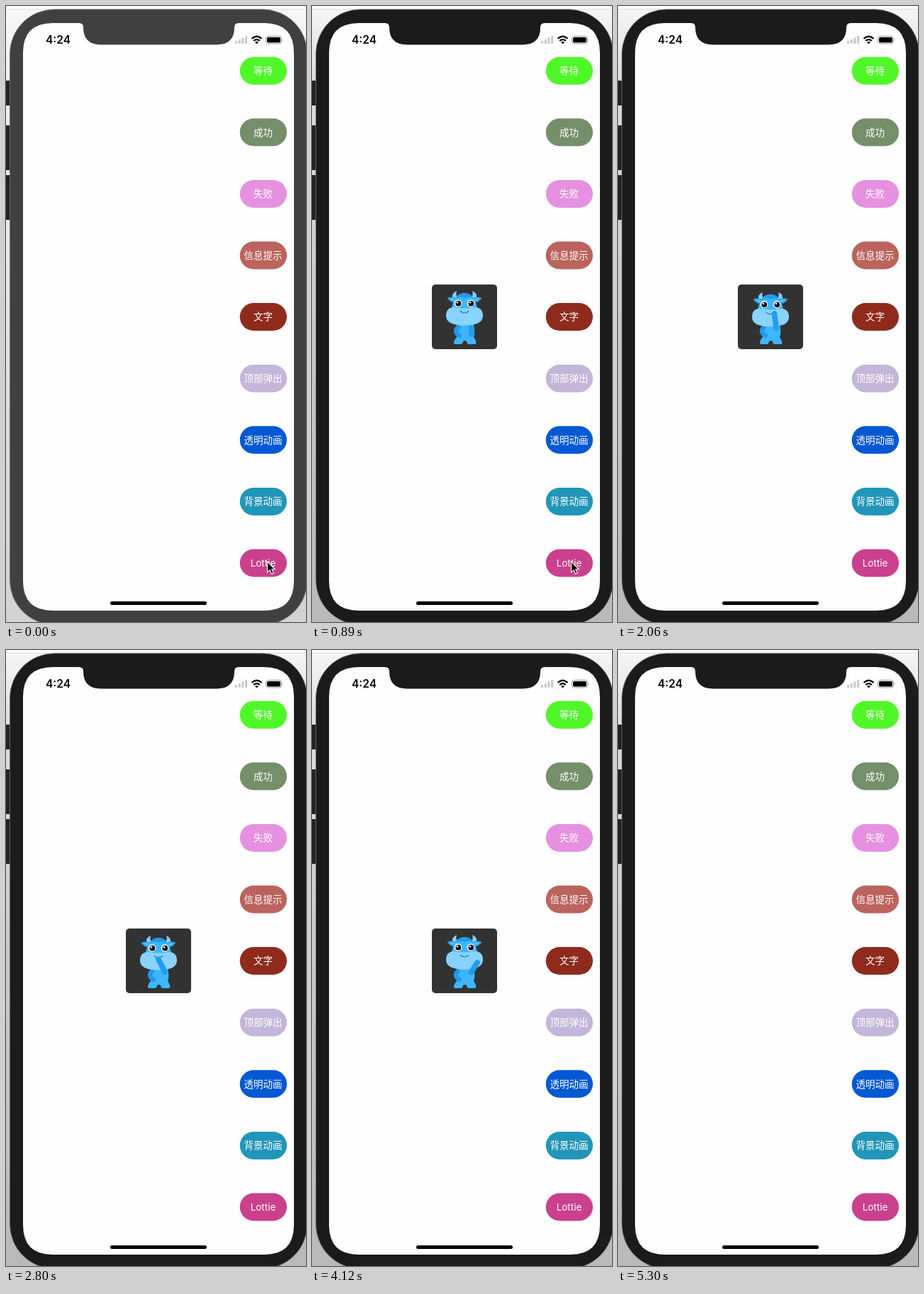
Write an HTML page that moves like this. It is 423 px wide and 867 px high and loops after 5.45 s.

```html
<!DOCTYPE html>
<html lang="zh">
<head>
<meta charset="utf-8">
<title>Popup demo</title>
<style>
  html, body { margin: 0; width: 100%; height: 100%; overflow: hidden; background: #fff; }
  svg { display: block; width: 100vw; height: 100vh; }
  .label { font: 13.5px Inter, "Noto Sans CJK SC", "Noto Sans CJK", sans-serif; fill: #fff; text-anchor: middle; }
  .clock { font: 600 15.5px Inter, sans-serif; }
</style>
</head>
<body>
<svg viewBox="0 0 423 867" preserveAspectRatio="none">
  <defs>
    <linearGradient id="idle" x2="0" y2="1">
      <stop offset="0" stop-color="#f7f7f7"/><stop offset=".12" stop-color="#efefef"/>
      <stop offset=".4" stop-color="#e9e9e9"/><stop offset="1" stop-color="#d2d2d2"/>
    </linearGradient>
    <linearGradient id="active" x2="0" y2="1">
      <stop offset="0" stop-color="#f6f6f6"/><stop offset=".12" stop-color="#dedede"/>
      <stop offset=".4" stop-color="#cfcfcf"/><stop offset="1" stop-color="#b9b9b9"/>
    </linearGradient>
  </defs>

  <rect id="page" width="423" height="867"/>
  <rect width="423" height="4" fill="#fdfdfd"/>
  <path d="M0 4.5H423" stroke="#dcdcdc"/>
  <path d="M0 105H6V140H0ZM0 168H6V231H0ZM0 238H6V301H0Z" fill="#222"/>
  <rect id="bezel" x="5.4" y="4.8" width="419.4" height="866" rx="63" stroke="#777" stroke-width=".8"/>
  <path fill="#fefefe" d="M66 24H103Q109 24 109 30Q109 54.500 134 54.500H297Q322 54.500 322 30Q322 24 328 24H364
    Q406 24 406 66V809Q406 851 364 851H66Q24 851 24 809V66Q24 24 66 24Z"/>

  <text class="clock" x="56" y="53">4:24</text>
  <g fill="#c9c9cb">
    <rect x="323" y="49" width="3" height="4" rx=".8"/><rect x="327.700" y="47" width="3" height="6" rx=".8"/>
    <rect x="332.400" y="44.500" width="3" height="8.500" rx=".8"/><rect x="337.100" y="42" width="3" height="11" rx=".8"/>
  </g>
  <g fill="none" stroke="#000" stroke-width="2.300">
    <path d="M346.500 46Q353.500 39.500 360.500 46"/>
    <path d="M349.200 49Q353.500 45.200 357.800 49"/>
  </g>
  <path d="M351 51Q353.500 48.800 356 51L353.500 53.500Z"/>
  <rect x="366.500" y="42.500" width="22" height="10.500" rx="3" fill="none" stroke="#999"/>
  <rect x="368" y="44" width="19" height="7.500" rx="1.800"/>
  <path d="M389.800 46Q391.600 47.700 389.800 49.500Z" fill="#999"/>
  <rect x="147" y="838" width="136" height="5" rx="2.500"/>

  <g id="buttons"></g>

  <g id="popup">
    <rect x="169" y="392" width="92" height="91" rx="5" fill="#323232"/>
    <path fill="#3db6ff" d="M205 445H227Q231 458 228 466Q231 470 231.500 474Q231.500 476 229 476H221Q218.500 476 218 472
      Q215.500 470 213 472Q212.500 476 210 476H202Q199.500 476 200 473Q201 469 204 466Q202 456 205 445Z"/>
    <path d="M206 452Q201 456 204 461L208 464" fill="none" stroke="#2199ec" stroke-width="6" stroke-linecap="round" stroke-linejoin="round"/>
    <g id="head">
      <g id="side">
        <path d="M199 413Q195.500 404 204 401Q202 407 206 411Z" fill="#83cff8"/>
        <path d="M204 411Q196 408 190.500 411Q195 418 204 418.500Z" fill="#2a9eef"/>
        <path d="M202 412.500Q197 410.500 193.500 411.700Q197 415.500 202 416Z" fill="#58bff9"/>
      </g>
      <use href="#side" transform="translate(430 0) scale(-1 1)"/>
      <path d="M196 432Q199 404 215 404Q231 404 234 432Z" fill="#3db6ff"/>
      <path d="M203 411Q208 404 215 404Q222 404 227 411Q220 408 215 411Q210 408 203 411Z" fill="#219bee"/>
      <g id="eye">
        <circle cx="206" cy="418.500" r="5.300" fill="#fff"/>
        <circle cx="206.300" cy="418.700" r="3.900" fill="#111"/>
        <circle cx="205" cy="417.200" r="1.300" fill="#fff"/>
      </g>
      <use href="#eye" x="18"/>
      <path d="M189 436Q189 424.500 200 424Q215 427 230 424Q241 424.500 241 436Q241 449.500 215 449.500Q189 449.500 189 436Z" fill="#88d3ff"/>
      <path d="M209 429.500Q215 434.500 221 429.500" fill="none" stroke="#1b78be" stroke-width="1.100" stroke-linecap="round"/>
    </g>
    <path id="arm" stroke="#219dee" stroke-width="7.600" stroke-linecap="round"/>
  </g>

  <path id="cursor" d="M0 0V15L3.500 11.800L6 17.500L8.700 16.300L6.200 10.800H10.800Z" stroke="#fff" stroke-width="1.100"/>
</svg>
<script>
  const LOOP = 5450, STEP = LOOP / 37;
  const $ = id => document.getElementById(id);
  const set = (id, name, value) => $(id).setAttribute(name, value);

  const buttons = [
    ['等待', '#50f728'], ['成功', '#748f69'], ['失败', '#e691e0'],
    ['信息提示', '#bb635d'], ['文字', '#8f2b1d'], ['顶部弹出', '#c3b6d9'],
    ['透明动画', '#0259d3'], ['背景动画', '#2196b9'], ['Lottie', '#ca408d']
  ];
  $('buttons').innerHTML = buttons.map(([text, color], i) => {
    const y = 71.7 + 86.6 * i;
    return `<rect x="329.7" y="${y}" width="66.3" height="39" rx="19.5" fill="${color}"/>
      <text class="label" x="362.5" y="${y + 24.3}">${text}</text>`;
  }).join('');

  // step, angle from upright, length, shoulder x, shoulder y
  const armKeys = [
    [6, 176, 9, 224.5, 453], [14, -7, 20, 223, 453], [19, -27, 20, 224, 453],
    [24, -48, 20, 225, 454], [32, 112, 12, 224, 453], [36, 176, 9, 224.5, 453]
  ];

  function armAt(step) {
    const i = Math.max(1, armKeys.findIndex(key => key[0] >= step));
    const a = armKeys[i - 1], b = armKeys[i];
    const p = Math.min(1, Math.max(0, (step - a[0]) / (b[0] - a[0])));
    const ease = p * p * (3 - 2 * p);
    return a.map((v, j) => v + (b[j] - v) * ease);
  }

  function draw(time) {
    const step = Math.floor((time % LOOP + 8) / STEP) % 37;
    const active = step >= 6;
    set('page', 'fill', active ? 'url(#active)' : 'url(#idle)');
    set('bezel', 'fill', active ? '#1b1b1b' : '#404040');

    const cursorX = step < 3 ? 368.5 : step < 4 ? 366.5 : 365.5;
    set('cursor', 'transform', `translate(${cursorX} 782)`);
    set('cursor', 'opacity', step < 10 ? 1 : 0);

    set('popup', 'opacity', !active || step === 36 ? 0 : step === 35 ? 0.6 : 1);
    const bob = 1.5 - 1.5 * Math.cos((step - 6) * STEP / 1600 * 2 * Math.PI);
    set('head', 'transform', `translate(0 ${bob})`);

    const [, angle, length, x, y] = armAt(step);
    const r = angle * Math.PI / 180;
    set('arm', 'd', `M${x} ${y}L${x + length * Math.sin(r)} ${y - length * Math.cos(r)}`);
  }

  const start = performance.now();
  function tick() {
    draw(performance.now() - start);
    requestAnimationFrame(tick);
  }
  tick();
</script>
</body>
</html>
```
